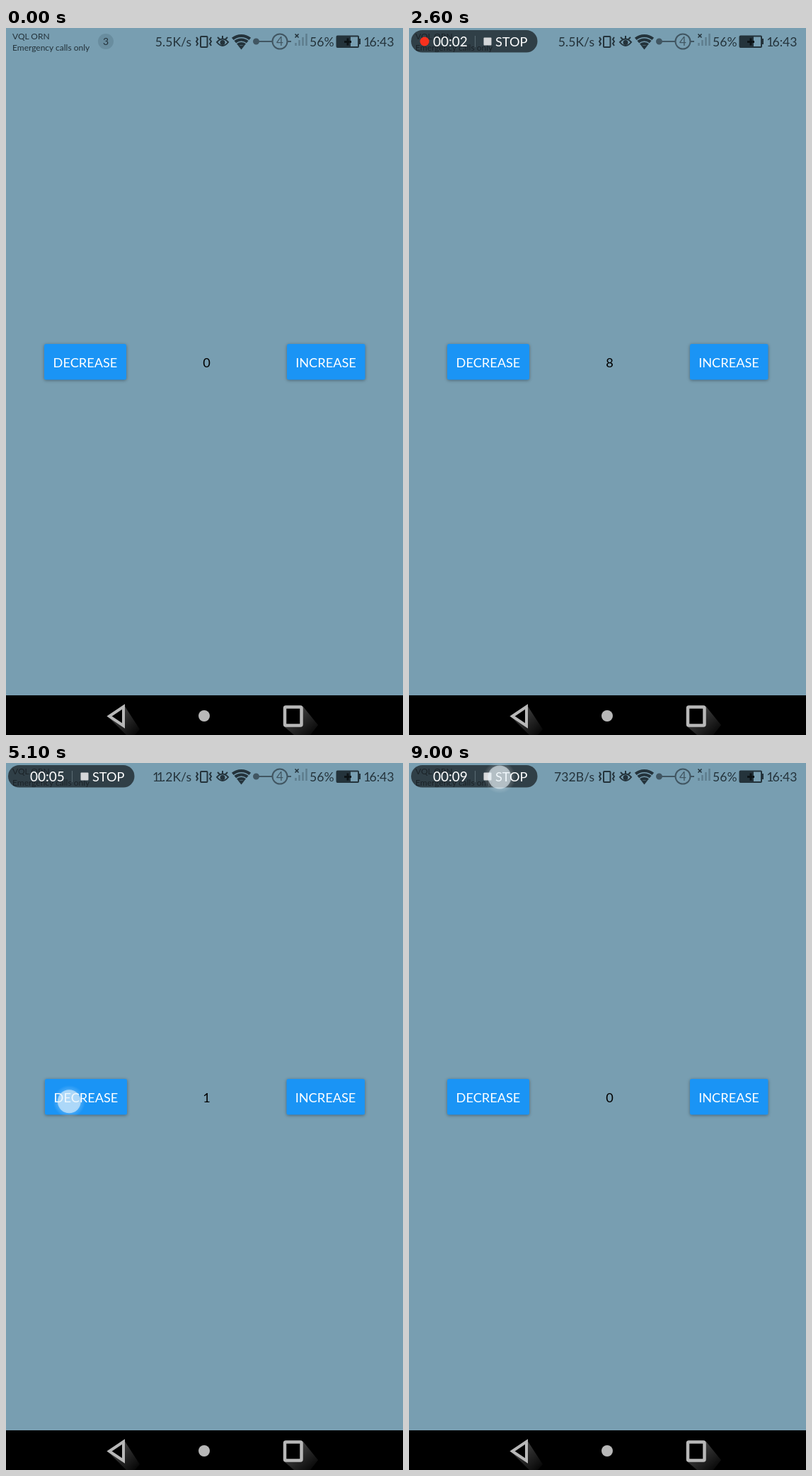
Animation of 561 by 998 pixels, one loop 9.05 s. Source, as an HTML page:

```html
<!DOCTYPE html>
<html lang="en">
<head>
<meta charset="utf-8">
<title>Counter</title>
<style>
  html, body { margin: 0; width: 100%; height: 100%; overflow: hidden; background: #789eb1; }
  svg { display: block; width: 100vw; height: 100vh; }
  text { font: 18.2px Lato, "Open Sans", sans-serif; white-space: pre; }
  .small { font-size: 12px; }
  .status { font-size: 17.6px; }
  .line { fill: none; stroke: #24333b; stroke-width: 2; }
  .ink { fill: #24333b; }
  .mid { text-anchor: middle; }
  .end { text-anchor: end; }
  .white { fill: #fff; }
  .button rect { fill: #1a94f5; filter: drop-shadow(0 1.5px 2.2px rgba(0, 0, 0, .36)); }
  .nav { fill: #000; stroke: #b8b8b8; stroke-width: 4.5; }
</style>
</head>
<body>
<svg viewBox="0 0 561 998">
  <defs>
    <linearGradient id="shade" x1="0" y1="0" x2="1" y2="1">
      <stop offset=".3" stop-color="#3c3c3c"/>
      <stop offset="1" stop-color="#000"/>
    </linearGradient>
    <radialGradient id="halo">
      <stop offset=".6" stop-color="#fff" stop-opacity=".26"/>
      <stop offset="1" stop-color="#fff" stop-opacity="0"/>
    </radialGradient>
  </defs>
  <rect width="561" height="998" fill="#789eb1"/>

  <!-- status bar -->
  <text class="small ink" x="9" y="16">VQL ORN</text>
  <text class="small ink" x="9" y="32">Emergency calls only</text>
  <g id="badge">
    <circle cx="141" cy="19" r="11" fill="#5f8293" opacity=".6"/>
    <text class="ink mid" x="141" y="24" style="font-size:14px">3</text>
  </g>
  <text id="speed" class="status ink end" x="262" y="26"/>
  <g class="line">
    <rect x="275" y="12" width="9.5" height="15" rx="1"/>
    <path d="M269 13l2 3-2 3 2 3-2 3M290 13l-2 3 2 3-2 3 2 3"/>
    <path d="M298 20Q306 11 314 20Q306 30 298 20ZM306 11v4M299 13l3 3M313 13l-3 3"/>
    <path id="wifi" style="stroke-width:4.2"/>
  </g>
  <circle class="ink" cx="306" cy="20.5" r="3.5"/>
  <path class="ink" d="M332.5 30.500l-4-5q4-2 8 0z"/>
  <g stroke="#415662" stroke-width="2" fill="none">
    <path d="M354 19H376.500M397.500 19H403"/>
    <circle cx="387" cy="19" r="10.500"/>
    <circle cx="353.500" cy="19" r="3.500" fill="#415662"/>
  </g>
  <text class="mid" x="387" y="25" fill="#415662" style="font-size:17px">4</text>
  <path class="line" d="M408.500 8.500l5 5M413.500 8.500l-5 5" style="stroke-width:1.6"/>
  <path d="M409.500 25v-4M414.500 25v-8M419.500 25v-12M424.500 25v-17" stroke="#4d6876" stroke-width="2.500" opacity=".6"/>
  <text class="status ink" x="429" y="26">56%</text>
  <rect class="line" x="467.500" y="11.500" width="30.500" height="15.500" rx="1"/>
  <path class="ink" d="M468 12h19v15h-19zM498 15h3v8h-3z"/>
  <path d="M478 19.500h10M483 14.500v10" stroke="#0c1316" stroke-width="3"/>
  <text id="clock" class="status ink end" x="548.500" y="26"/>

  <!-- recorder -->
  <g id="recorder">
    <rect id="pill" x="3" y="3" height="31.500" rx="15.750" fill="rgb(22,28,32)" fill-opacity=".73"/>
    <circle id="dot" cx="22" cy="19" r="6.500" fill="#f7311e"/>
    <text id="timer" class="white" x="34" y="26" style="font-size:19px"/>
    <g id="stop">
      <path d="M93.500 11v16" stroke="#5a6a72"/>
      <rect x="105.500" y="13.500" width="11" height="11" rx="1" fill="#d4d6d8"/>
      <text class="white" x="122" y="26">STOP</text>
    </g>
  </g>

  <!-- counter -->
  <g id="decrease" class="button">
    <rect x="54" y="446" width="116" height="50.500" rx="2.500"/>
    <text class="white mid" x="112" y="479">DECREASE</text>
  </g>
  <text id="count" class="mid" x="283.500" y="479"/>
  <g id="increase" class="button">
    <rect x="397" y="446" width="110.500" height="50.500" rx="2.500"/>
    <text class="white mid" x="452" y="479">INCREASE</text>
  </g>

  <!-- navigation bar -->
  <rect y="942" width="561" height="56" fill="#000"/>
  <path d="M167 956L189 990L182 998H170L145 973Z" fill="url(#shade)"/>
  <path d="M420 958L441 984L430 998H407L393 986Z" fill="url(#shade)"/>
  <path class="nav" d="M146 971.500L166 958V985Z" style="stroke-width:4"/>
  <circle cx="280" cy="971" r="8" fill="#b8b8b8"/>
  <rect class="nav" x="394" y="958.500" width="23.500" height="26" rx="1.500"/>

  <g id="touch">
    <circle r="23" fill="url(#halo)"/>
    <circle r="16.500" fill="#e8f3fb" fill-opacity=".6"/>
  </g>
</svg>
<script>
const LOOP = 9.05, PRESS = 0.17;
const $ = id => document.getElementById(id);
const show = (id, on) => $(id).setAttribute('visibility', on ? 'inherit' : 'hidden');
const move = (id, x, y = 0) => $(id).setAttribute('transform', `translate(${x} ${y})`);

// Each run is a series of taps; the count changes on release.
const runs = [
  { start: 0.6, every: 0.26, taps: 8, step: 1, from: [438, 486], to: [438, 486] },
  { start: 3.48, every: 0.235, taps: 14, step: -1, from: [92, 460], to: [87, 493] },
  { start: 6.82, every: 0.21, taps: 6, step: 1, from: [441, 485], to: [441, 485] }
];
const speeds = [[8.6, '732B/s'], [5.8, '210B/s'], [3, '11.2K/s'], [0, '5.5K/s']];

// Kerns the digit 1 on both sides so it is not tabular.
function setText(id, value) {
  const kern = c => c === '1' ? -2.15 : 0;
  const node = $(id);
  node.textContent = value;
  node.setAttribute('dx', [...value].map((c, i) => i ? kern(c) + kern(value[i - 1]) : 0).join(' '));
}

function tapState(t) {
  let count = 0, touch = t >= 8.65 ? [128, 20] : null;
  for (const { start, every, taps, step, from, to } of runs) {
    const done = Math.max(0, Math.min(taps, Math.floor((t - start) / every) + 1));
    count += done * step;
    const release = start + done * every;
    if (done < taps && t >= release - PRESS && t < release) {
      const k = done / (taps - 1);
      touch = from.map((v, i) => v + (to[i] - v) * k);
    }
  }
  return { count, touch };
}

function render(t) {
  const { count, touch } = tapState(t);
  setText('count', String(count));
  const spread = count < 0 ? 1 : count === 1 ? -1 : 0;
  move('decrease', -spread);
  move('increase', spread < 0 ? -0.5 : spread);

  show('touch', touch);
  if (touch) move('touch', ...touch);

  const recording = t >= 0.15;
  show('badge', !recording);
  show('recorder', recording);
  const second = Math.floor(t + 0.1);
  const shift = second === 1 ? -4.4 : second === 7 ? -1 : 0;
  setText('timer', `00:0${second}`);
  $('pill').setAttribute('width', 178.5 + shift);
  move('stop', shift);
  const phase = t % 1;
  show('dot', recording && phase >= 0.33 && phase < 0.83);

  setText('speed', speeds.find(([from]) => t >= from)[1]);
}

$('wifi').setAttribute('d', [8, 13.5, 19].map(r => {
  const dx = r * Math.sin(0.7), y = 30 - r * Math.cos(0.7);
  return `M${332.5 - dx} ${y}A${r} ${r} 0 0 1 ${332.5 + dx} ${y}`;
}).join(''));
setText('clock', '16:43');

let origin;
function tick(now) {
  origin ??= now;
  render((now - origin) / 1000 % LOOP);
  requestAnimationFrame(tick);
}
render(0);
requestAnimationFrame(tick);
</script>
</body>
</html>
```
